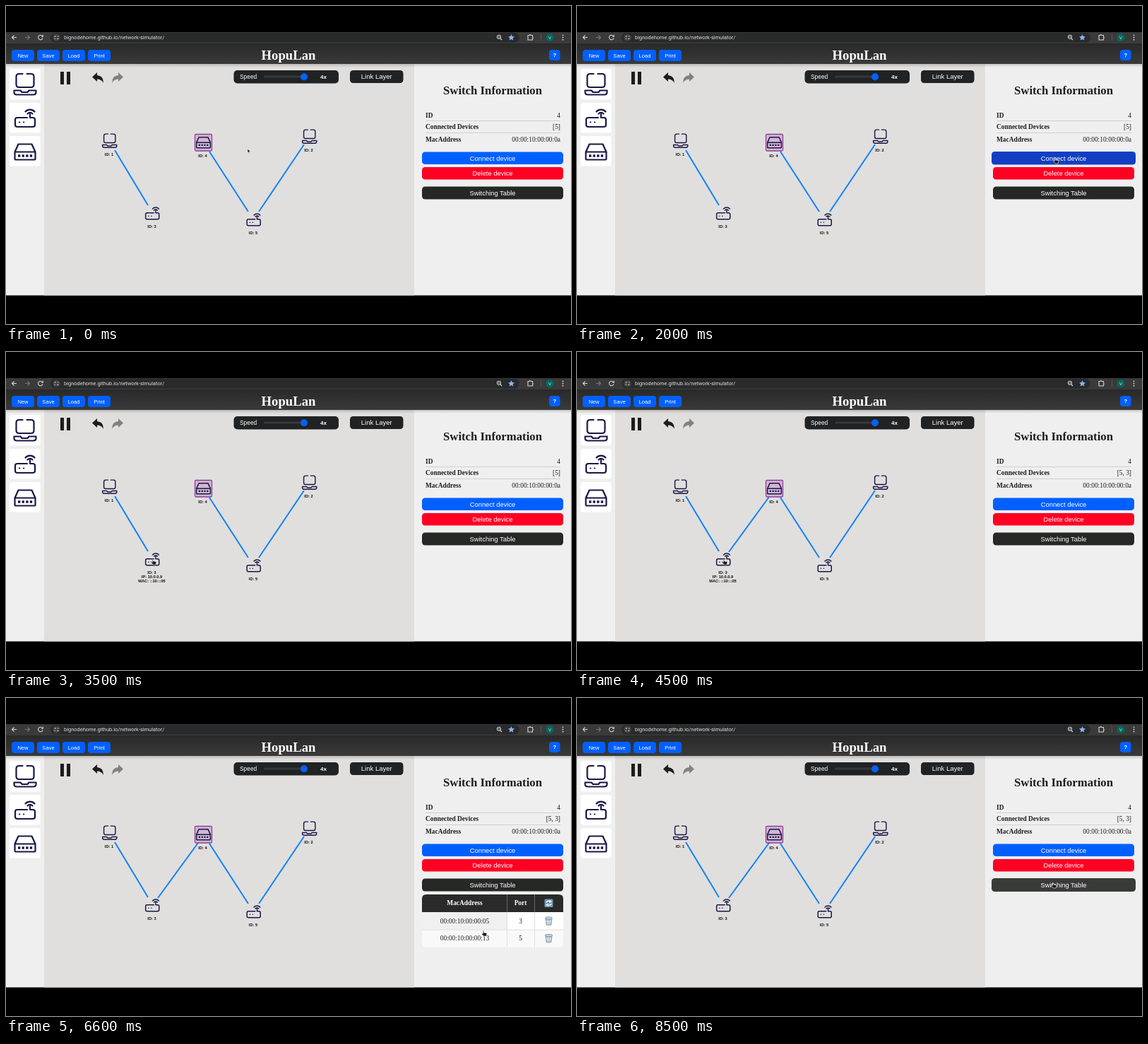
These frames come from a looping animation (800x450 px, 9.1 s). An HTML page:

```html
<!DOCTYPE html>
<html lang="en">
<head>
<meta charset="utf-8">
<title>Network simulator</title>
<style>
  html, body { margin: 0; width: 100%; height: 100%; overflow: hidden; background: #000; }
  svg { display: block; width: 800px; height: 450px; font-family: "Liberation Sans", Arial, sans-serif; }
  .serif { font-family: "Liberation Serif", "Times New Roman", serif; font-size: 9.4px; fill: #1c1c1c; }
  .bold { font-weight: bold; }
  .mid { text-anchor: middle; }
  .end { text-anchor: end; }
  .label { font-size: 5.7px; font-weight: bold; text-anchor: middle; fill: #111; }
  .line { fill: none; stroke: #d0d0d0; stroke-width: 1; }
  .bar { fill: none; stroke: #d6d6d6; stroke-width: 1.1; }
  .link { stroke: #1482fa; stroke-width: 2; }
  .icon { fill: none; stroke: #1b1745; stroke-width: 2.2; stroke-linecap: round; stroke-linejoin: round; }
</style>
</head>
<body>
<svg id="stage" viewBox="0 0 800 450">
  <defs>
    <linearGradient id="head" x2="0" y2="1">
      <stop offset="0" stop-color="#292929"/><stop offset="1" stop-color="#3a3a3a"/>
    </linearGradient>
    <linearGradient id="shade" x2="0" y2="1">
      <stop offset="0" stop-opacity=".16"/><stop offset="1" stop-opacity="0"/>
    </linearGradient>
    <g id="computer" class="icon">
      <path d="M13 1H8Q4 1 4 5V16Q4 20 8 20H25Q29 20 29 16V5Q29 1 25 1H19M1 24.5H10L12 27H20L22 24.5H32V27Q32 30.500 28 30.500H5Q1 30.500 1 27Z"/>
    </g>
    <g id="router" class="icon">
      <path d="M18 13H4Q1 13 1 16V23Q1 26 4 26H26Q29 26 29 23V16Q29 13 26 13H22V8M18.500 7.500A4.500 4.500 0 0 1 25.500 7.500M15.500 4.500A8.700 8.700 0 0 1 28.500 4.500M7 19.500H7.200M13 19.500H13.200"/>
    </g>
    <g id="switch" class="icon">
      <path d="M6 1H25L30 12V22Q30 23 29 23H2Q1 23 1 22V12ZM1 12H30"/>
      <path d="M5.500 17.500H26" stroke-width="3.500" stroke-linecap="butt" stroke-dasharray="3.300 2.300"/>
    </g>
    <g id="trash">
      <path d="M-4.500-3.500H4.500L3.500 5.500Q0 6.700-3.500 5.500Z" fill="#a9bcc8" stroke="#7890a0" stroke-width=".7"/>
      <path d="M-2.500-2L-1.800 5M0-2V5M2.500-2L1.800 5M-3.800 1H3.800" stroke="#e4edf2" stroke-width=".8"/>
      <ellipse cy="-4" rx="5.300" ry="1.700" fill="#c4d3dc" stroke="#708896" stroke-width=".8"/>
    </g>
  </defs>

  <!-- browser bar -->
  <rect y="37" width="800" height="16" fill="#3a3a3a"/>
  <rect x="63" y="38" width="664" height="13.500" rx="6.700" fill="#292a2b"/>
  <g class="bar">
    <path d="M15 44.500H8.500M11.500 41.500L8.500 44.500L11.500 47.500"/>
    <path d="M27 44.500H33.500M30.500 41.500L33.500 44.500L30.500 47.500" stroke="#777"/>
    <path d="M51.500 42.500A3.300 3.300 0 1 0 52 45.500M52.300 40.800V43.300H49.800"/>
    <circle cx="71.500" cy="44.500" r="5.300" fill="#414141" stroke="none"/>
    <path d="M68.500 43H71M73 43H74.500M68.500 46.300H70M72 46.300H74.500" stroke-width="1"/>
    <circle cx="698" cy="43.800" r="2.500"/><path d="M700 46L702 48M697 43.800H699"/>
    <path d="M739 41.500H741Q742 39.500 743 41.500H745.500V44Q747 45 745.500 46V48H739Z"/>
    <path d="M757.500 40V49" stroke="#555"/>
  </g>
  <path d="M715.500 40L716.800 43L720 43.300L717.600 45.400L718.400 48.600L715.500 46.900L712.600 48.600L713.400 45.400L711 43.300L714.200 43Z" fill="#8ab4f8"/>
  <circle cx="770" cy="44.500" r="5.500" fill="#00695f"/>
  <text x="770" y="46.600" class="mid" font-size="6" fill="#e8f4f2">V</text>
  <g fill="#ddd"><circle cx="788.500" cy="41.300" r=".9"/><circle cx="788.500" cy="44.500" r=".9"/><circle cx="788.500" cy="47.700" r=".9"/></g>
  <text x="82" y="47.200" font-size="7.450" fill="#dedede" font-family="Roboto, sans-serif">bignodehome.github.io/network-simulator/</text>

  <!-- page -->
  <rect y="53" width="800" height="29" fill="url(#head)"/>
  <rect y="82" width="800" height="327.500" fill="#efefef"/>
  <rect x="54" y="82" width="524" height="327.500" fill="#e0dfde"/>
  <rect y="82" width="800" height="5" fill="url(#shade)"/>
  <text x="400" y="76" class="serif bold mid" style="font-size:18.700px;fill:#fff">HopuLan</text>
  <g id="fixed"></g>

  <g fill="#fff">
    <rect x="5" y="89" width="43.500" height="43.500" rx="3"/>
    <rect x="5" y="137" width="43.500" height="42.500" rx="3"/>
    <rect x="5" y="184" width="43.500" height="42.500" rx="3"/>
  </g>
  <use href="#computer" x="10.500" y="95"/>
  <use href="#router" x="12" y="145"/>
  <use href="#switch" x="11.500" y="194.500"/>

  <path d="M77 93H82V111H77ZM86 93H91V111H86Z" fill="#1c1c1c"/>
  <path id="undo" d="M122 100.500L129 94V98Q138 98.500 138 109Q135 103.500 129 103.500V107Z" fill="#1c1c1c"/>
  <use href="#undo" transform="matrix(-1 0 0 1 288 0)" opacity=".48"/>

  <rect x="322.500" y="91" width="148.500" height="18.500" rx="5" fill="#202224"/>
  <text x="331" y="103" font-size="8.400" fill="#fff">Speed</text>
  <rect x="365" y="98.500" width="62" height="3" rx="1.500" fill="#36383a"/>
  <circle cx="422" cy="100.200" r="5" fill="#0062ff"/>
  <text x="449.500" y="103" class="bold mid" font-size="8" fill="#fff">4x</text>

  <!-- network -->
  <path class="link" d="M154 204L201 282M288 206L343 291M422 196L358 291"/>
  <path class="link" id="newLink" d="M272 205L215 283"/>
  <rect x="267.500" y="181.500" width="24" height="23.500" rx="1.500" fill="#a040b0" fill-opacity=".25" stroke="#933c9d" stroke-width="1.300"/>
  <use href="#computer" transform="translate(136 180.500) scale(.65)"/>
  <use href="#computer" transform="translate(419 174.500) scale(.65)"/>
  <use href="#router" transform="translate(197 284) scale(.68)"/>
  <use href="#router" transform="translate(340.500 293) scale(.68)"/>
  <use href="#switch" transform="translate(269 185) scale(.68)"/>
  <g class="label">
    <text x="146" y="211.500">ID: 1</text>
    <text x="428.500" y="206">ID: 2</text>
    <text x="206.500" y="313.500">ID: 3</text>
    <text x="278.500" y="213.500">ID: 4</text>
    <text x="350" y="322.500">ID: 5</text>
    <g id="details">
      <text x="206.500" y="320">IP: 10.0.0.9</text>
      <text x="206.500" y="326.300">MAC: ::10:::05</text>
    </g>
  </g>

  <!-- side panel -->
  <g class="serif">
    <text x="689" y="125" class="bold mid" font-size="16.750">Switch Information</text>
    <text x="594" y="157.500" class="bold">ID</text>
    <text x="594" y="174.300" class="bold">Connected Devices</text>
    <text x="594" y="191.500" class="bold">MacAddress</text>
    <text x="785" y="157.500" class="end">4</text>
    <text x="785" y="174.300" class="end" id="peers"></text>
    <text x="785" y="191.500" class="end">00:00:10:00:00:0a</text>
  </g>
  <path class="line" d="M594 162.500H785M594 179.500H785"/>
  <g id="connect"></g>
  <g id="tableBtn"></g>

  <g id="table" class="serif">
    <rect x="589" y="278" width="200" height="74.500" rx="6" fill="#fff"/>
    <rect x="589" y="303" width="120" height="25" fill="#f0f0f0"/>
    <path d="M589 328H789V346Q789 352.500 783 352.500H595Q589 352.500 589 346Z" fill="#f9f9f9"/>
    <path d="M589 303V284Q589 278 595 278H783Q789 278 789 284V303Z" fill="#2a2a2a"/>
    <path d="M709.500 278V303M748.500 278V303" stroke="#686868"/>
    <path class="line" d="M709.500 303V352M748.500 303V352M589 328H789" style="stroke:#dedede"/>
    <g class="mid">
      <g class="bold" fill="#fff"><text x="649.500" y="293">MacAddress</text><text x="728.500" y="293">Port</text></g>
      <text x="649.500" y="318.500">00:00:10:00:00:05</text><text x="728.500" y="318.500">3</text>
      <text x="649.500" y="343.300">00:00:10:00:00:13</text><text x="728.500" y="343.300">5</text>
    </g>
    <rect x="762.500" y="284.500" width="12" height="11.500" rx="1.500" fill="#6f9ab5"/>
    <path d="M764.800 289.500Q766 286.500 770.500 287.800M769.500 286.300L771.800 288.200L769 289.500M772.300 291Q771 294 766.500 292.800M767.500 291.300L765 292.500L767.500 294.300" fill="none" stroke="#fff" stroke-width="1.200"/>
    <use href="#trash" x="768.500" y="315.500"/>
    <use href="#trash" x="768.500" y="340"/>
  </g>

  <g id="cursor" fill="#151515" stroke="#fff" stroke-width=".6" stroke-linejoin="round">
    <path id="arrow" d="M0 0V5.800L1.300 4.700L2.200 6.700L3.200 6.200L2.300 4.300L4 4.100Z"/>
    <path id="hand" d="M1.300 4.500V.6Q2-.4 2.700.6V3L6 3.600Q7 4 6.800 5.200L6 8H2.500L-.3 5.200Q-.3 4 .5 4.200Z"/>
  </g>
</svg>
<script>
const $ = id => document.getElementById(id);
const BLUE = "#0060ff", DARK = "#262826";

// A labelled button; grow widens it evenly on every side.
const button = (text, x, y, w, h, fill, size = 9.4, grow = 0) =>
  `<rect x="${x - grow}" y="${y - grow / 4}" width="${w + 2 * grow}" height="${h + grow / 2}" rx="${h / 4}" fill="${fill}"/>
   <text x="${x + w / 2}" y="${y + h / 2 + size * .35}" class="mid" font-size="${size}" fill="#fff">${text}</text>`;

$("fixed").innerHTML =
  ["New", "Save", "Load", "Print"].map((s, i) => button(s, 8 + 36 * i, 62, 32, 16, BLUE, 7.6)).join("") +
  button("<tspan font-weight='bold'>?</tspan>", 769, 62, 15.5, 15, BLUE, 7.6) +
  button("Link Layer", 487, 91, 75.500, 18, "#202224", 9.5) +
  button("Delete device", 589, 228, 200, 17.500, "#ff0023");

// Pointer path: time, x, y of the tip
const path = [
  [1100, 342, 202], [1300, 385, 206], [1800, 650, 218], [2000, 675, 215], [2200, 675, 215],
  [2600, 364, 190], [2900, 240, 230], [3100, 206, 266], [3300, 206, 293], [4500, 206, 293],
  [4600, 209, 287], [4900, 390, 192], [5300, 641, 258], [5600, 672, 261], [5900, 672, 261],
  [6400, 676, 322], [6600, 674, 329], [6900, 674, 329], [7400, 766, 290], [7600, 768, 289],
  [7800, 672, 261]
];

function pointer(t) {
  const i = path.findIndex(p => p[0] > t);
  if (i < 1) return (i ? path[path.length - 1] : path[0]).slice(1);
  const [a, b] = [path[i - 1], path[i]], k = (t - a[0]) / (b[0] - a[0]);
  return [a[1] + (b[1] - a[1]) * k, a[2] + (b[2] - a[2]) * k];
}

const show = (id, on) => $(id).style.display = on ? "" : "none";
const within = (t, from, to) => t >= from && t < to;

function draw(t) {
  const [x, y] = pointer(t);
  const linked = t >= 3700;
  const overConnect = within(t, 1800, 2200), picking = within(t, 2200, 3500);
  const overTable = within(t, 5400, 6000) || t >= 7800;
  const overRouter = within(t, 3200, 4600);

  $("connect").innerHTML = button("Connect device", 589, 206.5, 200, 17.5,
    overConnect ? "#123fc2" : picking ? "#19197f" : BLUE, 9.4, overConnect ? 2 : picking ? 1 : 0);
  $("tableBtn").innerHTML = button("Switching Table", 589, 255.5, 200, 18,
    overTable ? "#393b39" : DARK, 9.4, overTable ? 2 : 0);
  $("peers").textContent = linked ? "[5, 3]" : "[5]";
  show("newLink", linked);
  show("details", overRouter);
  show("table", within(t, 5800, 8300));

  const hand = overConnect || overRouter || t >= 5200;
  show("hand", hand);
  show("arrow", !hand);
  $("cursor").setAttribute("transform", `translate(${x} ${y})`);
}

const start = performance.now();
function tick() {
  draw(Math.floor((performance.now() - start) % 9100 / 100) * 100);
  requestAnimationFrame(tick);
}
tick();
</script>
</body>
</html>
```
